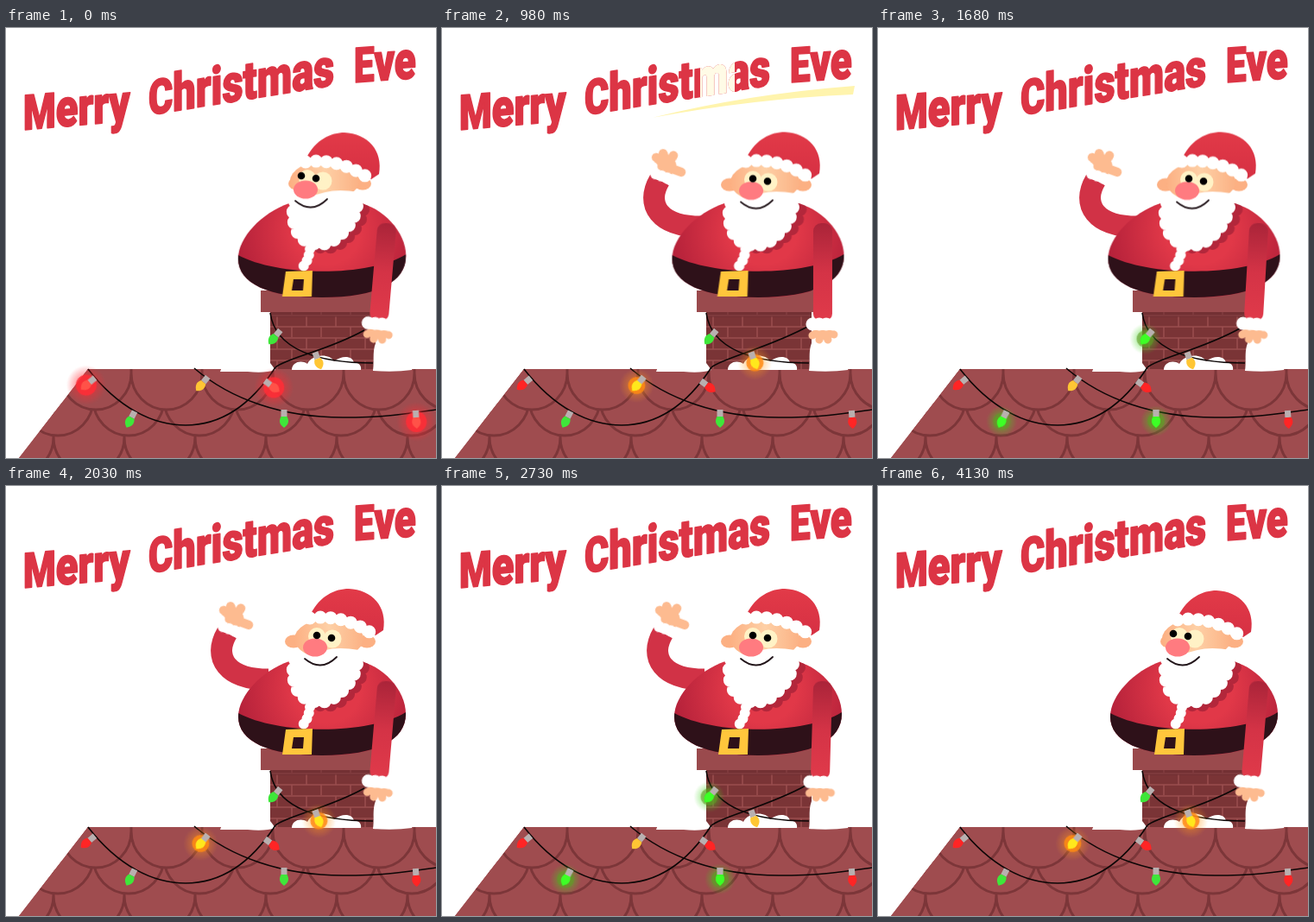
Write an HTML page without scripts that moves like this. It is 498 px wide and 498 px high and loops after 4200 ms.

```html
<!DOCTYPE html>
<html lang="en">
<head>
<meta charset="utf-8">
<title>Merry Christmas Eve</title>
<style>
html, body { margin: 0; width: 100%; height: 100%; overflow: hidden; background: #fff; }
svg { display: block; width: 100%; height: 100%; }
text { font: 900 61px Roboto, "Open Sans", sans-serif; }
tspan { font-size: 56px; }

.dots { fill: none; stroke: #fff; stroke-linecap: round; }
.wire { fill: none; stroke: #0c0606; stroke-width: 1.6; }
.skin { fill: none; stroke: #fdbb90; stroke-linecap: round; }

/* title shine and streak */
.band { animation: band 4.2s infinite; }
@keyframes band {
  0% { transform: translateX(-60px); animation-timing-function: step-end; }
  11.667% { transform: translateX(-27.7px); animation-timing-function: steps(11); }
  30%, 100% { transform: translateX(485.7px); }
}
.streak { animation: streak 4.2s linear infinite; }
@keyframes streak {
  0%, 10% { visibility: hidden; d: path("M17 133Q17 133 17 133L17 133Q17 133 17 133Z"); }
  10.01% { visibility: visible; d: path("M17 133Q17 133 17 133L17 133Q17 133 17 133Z"); }
  15% { d: path("M17 133Q130 123 245 98L247 105Q130 127 17 133Z"); }
  21.667% { d: path("M130 122Q300 88 478 67L476 77Q310 90 130 122Z"); }
  23.333% { d: path("M243 104Q350 77 478 67L476 77Q360 82 243 104Z"); }
  28.333% { visibility: visible; d: path("M477 71Q477 71 478 70L477 71Q477 71 477 71Z"); }
  28.34%, 100% { visibility: hidden; d: path("M477 71Q477 71 478 70L477 71Q477 71 477 71Z"); }
}

/* lights take turns */
.lit { animation: lit 1.05s step-end infinite; }
.g .lit { animation-delay: -.7s; }
.y .lit { animation-delay: -.35s; }
@keyframes lit { 0% { opacity: 1; } 33.333%, 100% { opacity: 0; } }
.r { color: #ff2525; }
.g { color: #3fe63a; }
.y { color: #ffc634; }
.r .lit { color: #ff5248; }
.g .lit { color: #3dff26; }
.y .lit { color: #ffe81c; }

/* breathing */
.belly, .bob, .wave { animation: belly .35s -.07s ease-in-out infinite alternate; }
.belly { transform-origin: 366px 312px; }
.bob { animation-name: bob; }
.wave { animation-name: wave; }
@keyframes belly { to { transform: scaleX(1.026); } }
@keyframes bob { to { transform: translateY(1.5px); } }
@keyframes wave { from { transform: translate(4px, -6px); } }

/* hanging arm and the wire it holds */
.sway, .held { animation: sway 1.05s ease-in-out infinite alternate; }
.sway { transform-origin: 441px 232px; }
.held { animation-name: held; }
@keyframes sway { from { transform: rotate(5deg); } }
@keyframes held {
  from { d: path("M312 393C325 382 372 374 415 350"); }
  to { d: path("M312 393C325 382 378 371 427 344"); }
}

/* greeting arm */
.sleeve { animation: sleeve 4.2s linear infinite; }
@keyframes sleeve {
  0%, 3.333%, 86.667%, 100% { d: path("M318 285C320 285 325 286 330 287"); }
  10%, 81.667% { d: path("M253 269C265 280 280 290 305 295"); }
  16.667%, 75% { d: path("M252 176C235 205 252 230 300 230"); }
}
.hand { animation: hand 4.2s linear infinite; }
@keyframes hand {
  0%, 3.333%, 86.667%, 100% { transform: translate(320px, 285px) rotate(-90deg); }
  10%, 81.667% { transform: translate(252px, 268px) rotate(-50deg); }
  16.667%, 75% { transform: translate(256px, 172px) rotate(20deg); }
}

/* head turn: each layer shifts by its own amount */
.turn { animation: turn 4.2s ease-in-out infinite; }
@keyframes turn {
  0%, 3.333%, 90%, 100% { transform: translate(var(--x), var(--y, 0px)); }
  16.667%, 78.333% { transform: none; }
}
</style>
</head>
<body>
<svg viewBox="0 0 498 498">
  <defs>
    <radialGradient id="coat" gradientUnits="userSpaceOnUse" cx="372" cy="235" r="112">
      <stop offset=".35" stop-color="#e13848"/>
      <stop offset="1" stop-color="#b01f39"/>
    </radialGradient>
    <linearGradient id="arm" x2="0" y2="1">
      <stop offset="0" stop-color="#aa2439"/>
      <stop offset=".5" stop-color="#d43346"/>
      <stop offset="1" stop-color="#e03a4a"/>
    </linearGradient>
    <linearGradient id="cap" x2="0" y2="1">
      <stop offset="0" stop-color="#e23a48"/>
      <stop offset="1" stop-color="#d63043"/>
    </linearGradient>
    <linearGradient id="face">
      <stop offset="0" stop-color="#fcb083"/>
      <stop offset=".5" stop-color="#fed0a6"/>
      <stop offset="1" stop-color="#fbb184"/>
    </linearGradient>
    <radialGradient id="red-halo">
      <stop offset=".4" stop-color="#ff2a32" stop-opacity=".5"/>
      <stop offset="1" stop-color="#ff2a32" stop-opacity="0"/>
    </radialGradient>
    <radialGradient id="green-halo">
      <stop offset=".3" stop-color="#3fd61c" stop-opacity=".5"/>
      <stop offset="1" stop-color="#3fd61c" stop-opacity="0"/>
    </radialGradient>
    <radialGradient id="gold-halo">
      <stop offset=".4" stop-color="#ff9a1a" stop-opacity=".4"/>
      <stop offset="1" stop-color="#ff9a1a" stop-opacity="0"/>
    </radialGradient>

    <clipPath id="roof"><path d="M95 395H498V498H15Z"/></clipPath>
    <clipPath id="shine"><rect class="band" width="40" height="140"/></clipPath>
    <clipPath id="trunk"><use href="#body"/></clipPath>

    <path id="body" d="M328 203C296 214 269 243 269 267C269 296 304 312 366 312C430 312 463 294 463 264C463 236 436 207 406 202Z"/>
    <path id="tiles" d="M0-40V0a41 42 0 0 0 82 0V-40V0a41 42 0 0 0 82 0V-40V0a41 42 0 0 0 82 0V-40V0a41 42 0 0 0 82 0V-40V0a41 42 0 0 0 82 0V-40V0a41 42 0 0 0 82 0V-40V0a41 42 0 0 0 82 0V-40"/>
    <pattern id="bricks" width="34" height="26" x="313" y="332" patternUnits="userSpaceOnUse">
      <path fill="#7a3436" d="M0 0h34v26H0z"/>
      <path fill="none" stroke="#9a4d4e" stroke-width="1.5" d="M0 1H34M0 14H34M1 1V14M18 14V26"/>
    </pattern>

    <g id="lamp">
      <path d="M-3.5-9h7v8h-7z" fill="#b9b0b0"/>
      <path d="M-3.5-1C-7 5-4 9 0 12C4 9 7 5 3.5-1Z" fill="currentColor"/>
    </g>
    <g id="glow-r">
      <circle cy="4" r="23" fill="url(#red-halo)"/>
      <circle cy="4" r="12" fill="#ff2d36" opacity=".85"/>
      <use href="#lamp"/>
    </g>
    <g id="glow-g">
      <circle cy="4" r="18" fill="url(#green-halo)"/>
      <circle cy="4" r="10" fill="#5f9b24" opacity=".6"/>
      <use href="#lamp"/>
    </g>
    <g id="glow-y">
      <circle cy="4" r="20" fill="url(#gold-halo)"/>
      <circle cy="4" r="10" fill="#ff8a12" opacity=".85"/>
      <use href="#lamp"/>
    </g>

    <g id="beard" fill="currentColor" stroke="currentColor">
      <path stroke="none" d="M331 196C327 215 334 240 345 246Q366 258 385 243C397 232 408 222 409 190Q385 186 370 190Q350 196 331 196Z"/>
      <path fill="none" stroke-width="16" stroke-linecap="round" stroke-dasharray="0 12"
        d="M335 201C329 218 336 240 346 245Q366 256 384 242C395 231 406 222 407 196"/>
    </g>

    <g id="title" stroke-width="1.8" stroke-linejoin="round">
      <text transform="translate(20 118) skewY(-5) scale(.77 1)"><tspan>M</tspan>erry</text>
      <text transform="translate(165 101) skewY(-9.2) scale(.77 1)"><tspan>C</tspan>hristmas</text>
      <text transform="translate(403 63) skewY(-4) scale(.75 1)"><tspan>E</tspan>ve</text>
    </g>
  </defs>

  <path class="streak" fill="#fff4ad" d="M17 133Z"/>
  <use href="#title" fill="#dc3545" stroke="#dc3545"/>
  <g clip-path="url(#shine)"><use href="#title" fill="#fffbe6" stroke="#fffbe6"/></g>

  <g clip-path="url(#roof)" fill="#9f4c4f" stroke="#7c3639" stroke-width="3">
    <path stroke="none" d="M0 390H498V498H0Z"/>
    <use href="#tiles" x="-27" y="474"/>
    <use href="#tiles" x="-63" y="430"/>
    <use href="#tiles" x="-19" y="400"/>
  </g>

  <!-- chimney and snow -->
  <path fill="url(#bricks)" d="M306 329H428V395H306Z"/>
  <path fill="#6c2c30" opacity=".5" d="M306 329H428V335H306Z"/>
  <path fill="#9a4a4d" d="M295 304H431V329H295Z"/>
  <g fill="#fff">
    <path d="M331 396C331 387 342 384 349 389C354 378 374 376 380 386C390 378 402 380 403 388C409 387 412 392 411 396Z"/>
    <path d="M248 398Q249 390 266 392L306 388L312 396Q300 400 280 398Z"/>
    <path d="M425 397C427 384 423 370 431 360H460V388Q472 391 470 396Q450 399 425 397Z"/>
  </g>

  <g class="wire">
    <path d="M95 395C130 440 170 460 208 460C255 460 288 430 312 393"/>
    <path d="M218 394C260 430 320 451 390 451C440 451 470 446 498 442"/>
    <path d="M306 330C312 373 362 388 425 388"/>
    <path class="held" d="M312 393C325 382 372 374 415 350"/>
  </g>

  <g class="r">
    <g transform="translate(96 411) rotate(50)"><use href="#lamp"/><use class="lit" href="#glow-r"/></g>
    <g transform="translate(307 414) rotate(-53)"><use href="#lamp"/><use class="lit" href="#glow-r"/></g>
    <g transform="translate(475 452) rotate(-4)"><use href="#lamp"/><use class="lit" href="#glow-r"/></g>
  </g>
  <g class="g">
    <g transform="translate(145 452) rotate(27)"><use href="#lamp"/><use class="lit" href="#glow-g"/></g>
    <g transform="translate(322 451)"><use href="#lamp"/><use class="lit" href="#glow-g"/></g>
    <g transform="translate(312 357) rotate(40)"><use href="#lamp"/><use class="lit" href="#glow-g"/></g>
  </g>
  <g class="y">
    <g transform="translate(228 411) rotate(40)"><use href="#lamp"/><use class="lit" href="#glow-y"/></g>
    <g transform="translate(361 384) rotate(-20)"><use href="#lamp"/><use class="lit" href="#glow-y"/></g>
  </g>

  <!-- greeting arm, behind the body -->
  <g class="wave">
    <path class="sleeve" fill="none" stroke="#d13246" stroke-width="25" d="M318 285C320 285 325 286 330 287"/>
    <g class="hand">
      <circle cy="-13" r="11" fill="#fdbb90"/>
      <path class="skin" stroke-width="10.5" d="M0-12l-15-6M0-13l-9-12M0-14l3-13M0-12l18 0"/>
      <path class="dots" stroke-width="13" stroke-dasharray="0 7" d="M-9 0H10"/>
    </g>
  </g>

  <!-- body -->
  <g class="belly">
    <use href="#body" fill="url(#coat)"/>
    <g clip-path="url(#trunk)">
      <use href="#beard" x="7" y="4" color="#b3273b"/>
      <path fill="#2e1119" d="M260 257C300 289 430 291 470 257V320H260Z"/>
    </g>
    <path class="dots" stroke-width="12" stroke-dasharray="0 7" d="M352 256Q350 272 342 278"/>
    <path fill="#ffc63c" fill-rule="evenodd" d="M324 282L355 281L354 311L320 311ZM333 291L331 304H344L345 291Z"/>
  </g>

  <!-- head -->
  <g class="bob">
    <g fill="#fcb083">
      <ellipse class="turn" style="--x:4px" cx="333" cy="180" rx="10" ry="7.5"/>
      <ellipse class="turn" style="--x:-5px" cx="418" cy="180" rx="10" ry="7.5"/>
    </g>
    <ellipse class="turn" style="--x:-5px" cx="374" cy="177" rx="40" ry="23" fill="url(#face)"/>
    <use href="#beard" color="#fff"/>
    <g class="turn" style="--x:-5px;--y:2px">
      <path fill="url(#cap)" d="M353 148C364 127 381 119 397 119C424 120 442 140 437 167L428 173L390 158Z"/>
      <path class="dots" stroke-width="15" stroke-dasharray="0 12" d="M352 153Q390 148 424 171"/>
    </g>
    <g class="turn" style="--x:-11px">
      <g fill="#fff2c6">
        <circle cx="360" cy="174" r="10"/>
        <circle cx="378" cy="177" r="10.5"/>
      </g>
      <path fill="none" stroke="#22151a" stroke-width="1.8" stroke-linecap="round" d="M346 200Q365 216 383 198"/>
      <ellipse cx="358" cy="187" rx="14" ry="10.5" fill="#ff7b80"/>
    </g>
    <g class="turn" style="--x:-18px;--y:-2px">
      <circle cx="360" cy="173" r="4.3"/>
      <circle cx="377" cy="176" r="4.3"/>
    </g>
  </g>

  <!-- hanging arm -->
  <g class="sway">
    <rect x="430" y="226" width="22" height="114" rx="9" fill="url(#arm)"/>
    <path class="skin" stroke-width="9" d="M437 351l-8 5M440 351l-3 10M443 351l4 10M446 351l8 4"/>
    <path class="dots" stroke-width="15" stroke-dasharray="0 8" d="M429 343H454"/>
  </g>
</svg>
</body>
</html>
```
